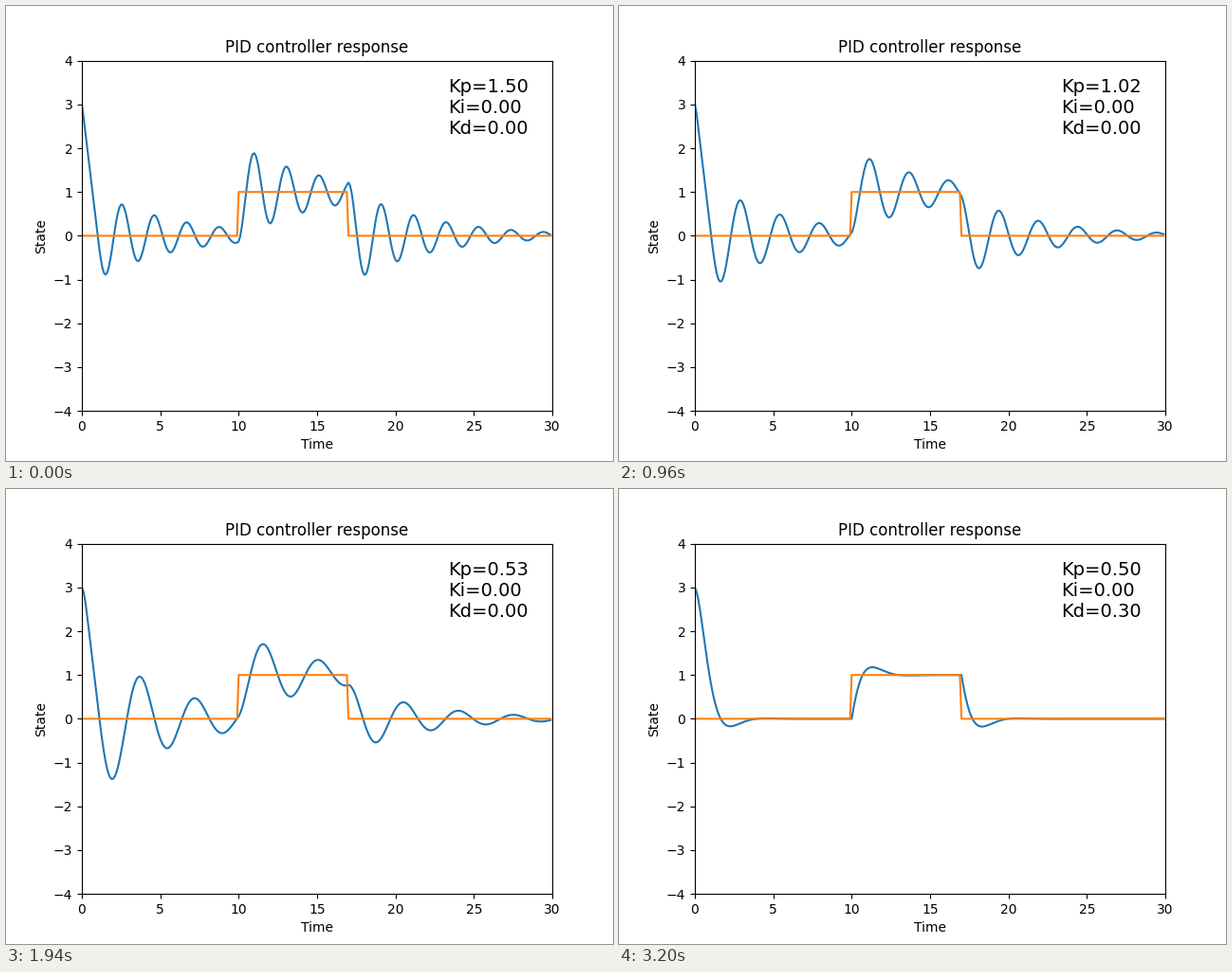
A matplotlib script for the animation above (5000 ms loop, 640 px wide and 480 px high).

```python
import numpy as np
import matplotlib.pyplot as plt
from matplotlib.animation import FuncAnimation

FRAMES, INTERVAL = 250, 20
DT = 0.1
GAIN, DRAG, MAX_SPEED = 6.0, 0.4, 3.0
P_STEPS, D_STEPS = 100, 60

time = np.arange(300) * DT
steps = np.arange(len(time))
target = np.where((steps >= 100) & (steps < 170), 1.0, 0.0)


def gains(frame):
    """Lower Kp first, then raise Kd, then hold."""
    kp = 1.5 - 0.01 * min(frame, P_STEPS)
    kd = 0.005 * min(max(frame - P_STEPS, 0), D_STEPS)
    return kp, 0.0, kd


def simulate(kp, ki, kd):
    """Speed-limited mass with drag, pushed by a PID controller."""
    x, v, total = 3.0, 0.0, 0.0
    last = target[0] - x
    states = []
    for goal in target:
        states.append(x)
        error = goal - x
        total += error * DT
        push = kp * error + ki * total + kd * (error - last) / DT
        last = error
        v += (GAIN * push - DRAG * v) * DT
        v = min(max(v, -MAX_SPEED), MAX_SPEED)
        x += v * DT
    return states


fig, ax = plt.subplots(figsize=(6.4, 4.8), dpi=100)
ax.set(xlim=(0, 30), ylim=(-4, 4), xlabel="Time", ylabel="State",
       title="PID controller response")
response, = ax.plot([], [])
ax.plot(time, target)
label = ax.text(0.95, 0.95, "", transform=ax.transAxes, fontsize=14,
                ha="right", va="top", multialignment="left")


def update(frame):
    kp, ki, kd = gains(frame)
    response.set_data(time, simulate(kp, ki, kd))
    label.set_text(f"Kp={kp:.2f}\nKi={ki:.2f}\nKd={kd:.2f}")
    return response, label


anim = FuncAnimation(fig, update, frames=FRAMES, interval=INTERVAL,
                     init_func=lambda: update(0), repeat=True, repeat_delay=0)
plt.show()
```
